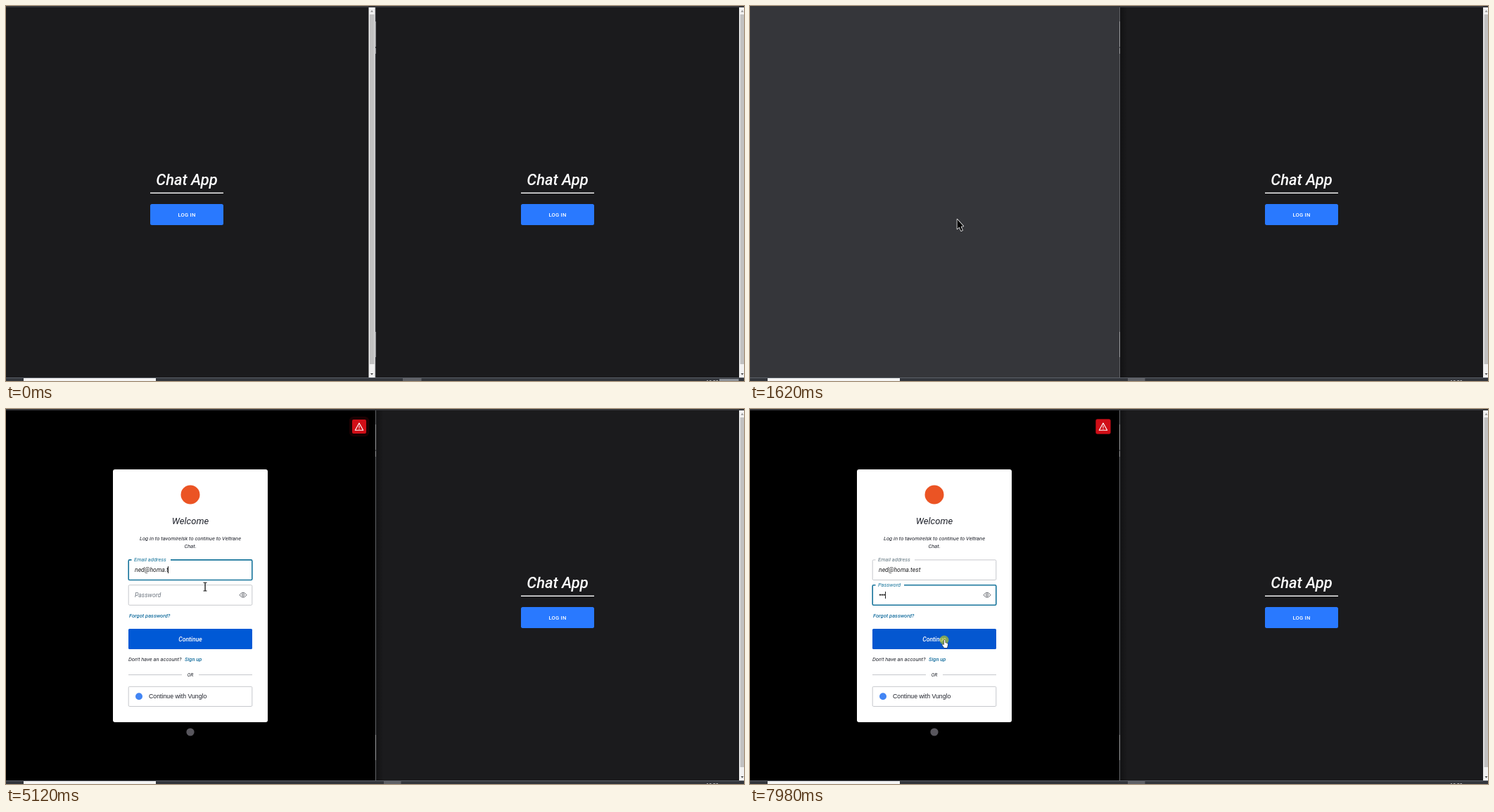
These frames come from a looping animation (1049 by 534 pixels, 8 s). An HTML page with a canvas:

```html
<!DOCTYPE html>
<html lang="en">
<head>
<meta charset="utf-8">
<title>Chat login</title>
<style>
  html, body { margin: 0; width: 100%; height: 100%; overflow: hidden; background: #1b1b1d; }
  canvas { display: block; width: 1049px; height: 534px; }
</style>
</head>
<body>
<canvas id="stage" width="1049" height="534"></canvas>
<script>
const ctx = document.getElementById('stage').getContext('2d');
const LOOP = 8000;
const ROBOTO = 'Roboto, sans-serif';
const TEAL = '#16749b', LINK = '#176f9f', INK = '#1e212a', BORDER = '#c6c8cc';

const EMAIL = 'ned@homa.test';
const EMAIL_TIMES = [2900, 3050, 3260, 3540, 3680, 3800, 3900, 4290, 4850, 5040, 5220, 5400, 5560];
const DOT_TIMES = [7140, 7350, 7560];
const FOCUS = 1150, BLANK = 1550, LOGIN = 1830, PASSWORD_FOCUS = 6520;

// [start, end, from, to]; the pointer rests between moves
const MOVES = [
  [320, 1010, [964, 531], [294, 303]],
  [1980, 2440, [294, 303], [269, 240]],
  [2580, 2950, [269, 240], [283, 253]],
  [6100, 6300, [283, 253], [280, 264]],
  [7400, 7770, [280, 264], [276, 329]]
];
const CLICKS = [[1150, 1220], [6450, 6590], [7900, 8000]];

const clamp = v => Math.max(0, Math.min(1, v));
const smooth = v => v * v * (3 - 2 * v);

function rect(x, y, w, h, color) {
  ctx.fillStyle = color;
  ctx.fillRect(x, y, w, h);
}

function roundRect(x, y, w, h, r, color) {
  ctx.beginPath();
  ctx.roundRect(x, y, w, h, r);
  ctx.fillStyle = color;
  ctx.fill();
}

function circle(x, y, r, color) {
  ctx.beginPath();
  ctx.arc(x, y, r, 0, Math.PI * 2);
  ctx.fillStyle = color;
  ctx.fill();
}

function text(str, x, y, font, color, align = 'left') {
  ctx.font = font;
  ctx.fillStyle = color;
  ctx.textAlign = align;
  ctx.fillText(str, x, y);
}

const italic = (size, weight = 400) => `italic ${weight} ${size}px ${ROBOTO}`;

function shape(points, fill, stroke, width) {
  ctx.beginPath();
  points.forEach(([x, y]) => ctx.lineTo(x, y));
  ctx.closePath();
  ctx.lineJoin = 'round';
  ctx.lineWidth = width;
  if (stroke) { ctx.strokeStyle = stroke; ctx.stroke(); }
  if (fill) { ctx.fillStyle = fill; ctx.fill(); }
}

function drawScrollbar(x, width) {
  rect(x, 2, width, 527, '#f1f1f1');
  rect(x + 1.5, 12, Math.min(6.5, width - 1.5), 498, '#c1c1c1');
  const mid = x + 4.5;
  shape([[mid - 2, 8.5], [mid + 2, 8.5], [mid, 6]], '#8a8a8a');
  shape([[mid - 2, 523], [mid + 2, 523], [mid, 525.5]], '#444');
}

function drawHome(x) {
  rect(x, 2, 516, 527, '#1b1b1d');
  text('Chat App', x + 257, 255, italic(22, 500), '#fff', 'center');
  rect(x + 205, 265.6, 104, 1.4, '#fff');
  roundRect(x + 205, 282, 104, 30, 2.5, '#2979ff');
  ctx.letterSpacing = '0.22px';
  text('LOG IN', x + 257, 299.5, `500 7.6px ${ROBOTO}`, '#fff', 'center');
  ctx.letterSpacing = '0px';
}

function drawField(y, label, labelWidth, focused, raised) {
  ctx.lineWidth = focused ? 1.6 : 1;
  ctx.strokeStyle = focused ? TEAL : BORDER;
  ctx.beginPath();
  ctx.roundRect(174.2, y + 0.5, 175.6, 28.6, 1.5);
  ctx.stroke();
  if (raised) {
    rect(178.5, y - 2, labelWidth, 5, '#fff');
    text(label, 182, y + 2.8, italic(7.5), focused ? TEAL : '#647882');
  } else {
    text(label, 183, y + 17.8, italic(8.7), '#6f7780');
  }
}

function drawEye() {
  ctx.strokeStyle = '#62656c';
  ctx.lineWidth = 1;
  ctx.beginPath();
  ctx.moveTo(332, 264.8);
  ctx.quadraticCurveTo(337, 257.8, 342, 264.8);
  ctx.quadraticCurveTo(337, 271.8, 332, 264.8);
  ctx.stroke();
  ctx.beginPath();
  ctx.arc(337, 264.8, 1.6, 0, 7);
  ctx.stroke();
}

function drawBadge(t) {
  const p = ((t + 300) % 820) / 820;
  const spread = Math.min(7 * p, 4.2);
  const alpha = clamp(1 - p / 0.7);
  if (alpha > 0) {
    roundRect(492 - spread, 15 - spread, 20 + 2 * spread, 20 + 2 * spread, 2 + spread,
      `rgba(208,14,23,${alpha})`);
  }
  roundRect(492, 15, 20, 20, 2, '#d00e17');
  shape([[502, 20], [507.7, 30.3], [496.3, 30.3]], null, '#fff', 1.1);
  rect(501.5, 23.5, 1, 3.6, '#fff');
  rect(501.5, 28, 1, 1, '#fff');
}

function drawCaret(t, since, x, y) {
  if ((t - since) % 1060 < 530) rect(Math.round(x), y, 1, 10, '#222');
}

function drawLogin(t) {
  rect(0, 2, 525, 527, '#000');
  drawBadge(t);
  roundRect(152, 86, 220, 360, 3, '#fff');
  circle(262, 122, 13.5, '#eb5424');
  circle(262, 460, 5.6, '#58565d');

  text('Welcome', 262, 164, italic(13), INK, 'center');
  text('Log in to tavomirelsk to continue to Veltrane', 262, 187, italic(7.6), INK, 'center');
  text('Chat.', 262, 198.4, italic(7.6), INK, 'center');

  const onPassword = t >= PASSWORD_FOCUS;
  drawField(214.4, 'Email address', 55.5, !onPassword, true);
  drawField(250.2, 'Password', 40.5, onPassword, onPassword);
  drawEye();

  const typed = EMAIL_TIMES.filter(k => k <= t).length;
  const email = EMAIL.slice(0, typed);
  text(email, 183, 232, italic(8.7), '#1e1e20');
  if (onPassword) {
    const dots = DOT_TIMES.filter(k => k <= t).length;
    for (let i = 0; i < dots; i++) circle(185 + i * 2.8, 264.6, 1.2, '#222');
    drawCaret(t, DOT_TIMES[dots - 1] || PASSWORD_FOCUS, 183 + dots * 2.9, 260);
  } else {
    const end = 183 + ctx.measureText(email).width;
    drawCaret(t, EMAIL_TIMES[typed - 1] || LOGIN, end - 0.5, 224);
  }

  text('Forgot password?', 175, 297, italic(7.5, 500), LINK);
  roundRect(174, 313, 176, 29, 1.6, t >= 7700 ? '#0457d0' : '#0059d6');
  text('Continue', 262, 330.5, italic(8.6, 500), '#fff', 'center');
  text("Don't have an account?", 174, 359, italic(7.6), INK);
  text('Sign up', 254, 359, italic(7.5, 500), LINK);

  rect(174, 378, 76, 1, BORDER);
  rect(274, 378, 76, 1, BORDER);
  text('OR', 262, 380.8, italic(6.7), INK, 'center');

  ctx.lineWidth = 1;
  ctx.strokeStyle = BORDER;
  ctx.beginPath();
  ctx.roundRect(174.2, 395.3, 175.6, 28.2, 1.5);
  ctx.stroke();
  circle(189, 409.3, 5, '#4285f4');
  text('Continue with Vunglo', 203, 412, '8.75px "Liberation Sans", Arial, sans-serif', '#1e212a');
}

function drawFrame(t) {
  rect(0, 0, 1049, 2, '#36373b');
  rect(0, 529, 1049, 5, '#33363c');
  rect(0, 529, 1049, 1, '#5b6068');
  rect(25, 530, 188, 4, '#f4f4f4');
  rect(t < FOCUS ? 564 : 537, 530, t < FOCUS ? 26.5 : 24.5, 4, '#5f6167');
  text('10:20', 1004, 538, `7px ${ROBOTO}`, '#fff', 'center');
  if (t < 70) rect(1014, 531, 27.5, 3, '#8e939a');
}

function drawSeam(t) {
  rect(525, 2, 1, 527, t < BLANK ? '#3c3d40' : '#626366');
  rect(525, 22, 1, 36, '#9b9c9e');
  rect(525, 60, 1, 8, '#9b9c9e');
  rect(525, 464, 1, 36, '#9b9c9e');
  if (t >= FOCUS) {
    const shade = ctx.createLinearGradient(526, 0, 537, 0);
    shade.addColorStop(0, 'rgba(0,0,0,.3)');
    shade.addColorStop(1, 'rgba(0,0,0,0)');
    rect(526, 2, 11, 527, shade);
  }
}

function pointerAt(t) {
  let pos = MOVES[0][2];
  for (const [start, end, from, to] of MOVES) {
    if (t < start) break;
    const k = smooth(clamp((t - start) / (end - start)));
    pos = from.map((v, i) => v + (to[i] - v) * k);
  }
  return pos;
}

function drawArrow() {
  shape([[0.5, 0.8], [0.5, 14.5], [3.5, 11.8], [6, 17.3], [8, 16.3], [5.7, 11], [9.3, 10.6]],
    '#000', '#fff', 1.5);
}

function drawBeam() {
  rect(-0.6, -5.5, 1.3, 11.5, '#111');
  rect(-2.5, -6.3, 5, 1, '#111');
  rect(-2.5, 5.5, 5, 1, '#111');
}

function drawHand() {
  shape([[0, 0], [1.4, 0], [1.6, 4], [4.8, 4.8], [5.2, 6.2], [4.6, 9.3], [4, 11], [0, 11],
    [-2.8, 7], [-2, 6], [-0.2, 7]], '#fff', '#333', 1.1);
}

function drawPointer(t) {
  if (t < 320) return;
  const [x, y] = pointerAt(t);
  if (CLICKS.some(([a, b]) => t >= a && t < b)) circle(x, y, 6.5, 'rgba(190,205,30,.65)');
  ctx.save();
  ctx.translate(x, y);
  const inField = t > LOGIN && y > 214 && y < 280;
  const onButton = t > LOGIN && y >= 313 && y < 342;
  if (inField) drawBeam();
  else if (onButton) drawHand();
  else drawArrow();
  ctx.restore();
}

function render(t) {
  drawFrame(t);
  drawHome(527);
  rect(526, 2, 1, 527, '#1b1b1d');
  drawScrollbar(1042, 7);
  if (t < BLANK) {
    drawHome(0);
    drawScrollbar(515.5, 9);
  } else if (t < LOGIN) {
    rect(0, 2, 525, 527, '#35363a');
  } else {
    drawLogin(t);
  }
  drawSeam(t);
  drawPointer(t);
}

function tick() {
  render(performance.now() % LOOP);
  requestAnimationFrame(tick);
}
tick();
</script>
</body>
</html>
```
